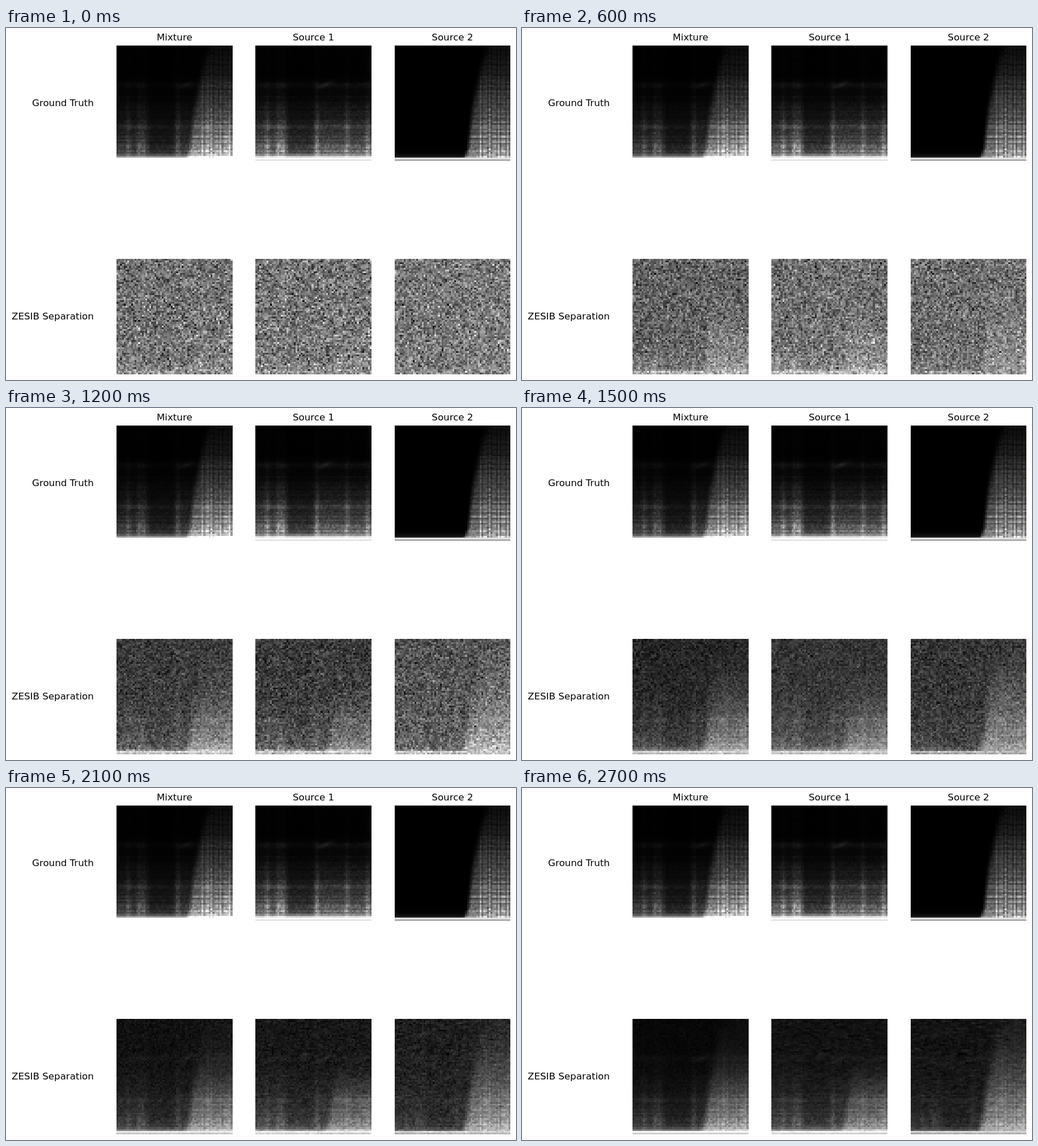
An HTML page with a canvas that plays this animation: 900x622 px, repeating every 3600 ms.

```html
<!DOCTYPE html>
<html lang="en">
<head>
<meta charset="utf-8">
<title>Spectrogram separation</title>
<style>
  html, body { margin: 0; width: 100%; height: 100%; overflow: hidden; background: #fff; }
  svg, canvas { position: absolute; left: 0; top: 0; }
  text { font: 16.67px "DejaVu Sans", sans-serif; fill: #000; }
</style>
</head>
<body>
<canvas id="stage" width="900" height="622"></canvas>
<svg width="900" height="622">
  <g text-anchor="middle">
    <text x="297.3" y="22.3">Mixture</text>
    <text x="542.6" y="22.3">Source 1</text>
    <text x="787.9" y="22.3">Source 2</text>
  </g>
  <g text-anchor="end">
    <text x="154.8" y="138">Ground Truth</text>
    <text x="154.8" y="515">ZESIB Separation</text>
  </g>
</svg>
<script>
const N = 64, STEP = 300, LOOP = 3600, LAST = 9;
const SIZE = 204.5, LEFT = 195, TOP = 30.6, GAP_X = 245.4, GAP_Y = 377;

const ctx = document.getElementById("stage").getContext("2d");
ctx.imageSmoothingEnabled = false;
const tile = document.createElement("canvas");
tile.width = tile.height = N;
const tileCtx = tile.getContext("2d");

function random(seed) {
  return () => {
    seed = seed + 0x6D2B79F5 | 0;
    let t = Math.imul(seed ^ seed >>> 15, 1 | seed);
    t = t + Math.imul(t ^ t >>> 7, 61 | t) ^ t;
    return ((t ^ t >>> 14) >>> 0) / 4294967296;
  };
}

function gaussian(rnd) {
  return Math.sqrt(-2 * Math.log(1 - rnd())) * Math.cos(2 * Math.PI * rnd());
}

const fill = (n, make) => Array.from({ length: n }, (_, i) => make(i));
const grid = f => fill(N * N, i => f(i / N | 0, i % N, i));
const clamp = v => Math.min(1, Math.max(0, v));
const bump = (x, mid, width) => Math.exp(-(((x - mid) / width) ** 2));
const smooth = (a, b, x) => {
  const k = clamp((x - a) / (b - a));
  return k * k * (3 - 2 * k);
};

const rnd = random(41);
const rowNoise = fill(N, () => rnd() - .5);
const grain = grid(() => rnd() - .5);
const streak = [];
for (let i = 0; i < N * N; i++) {
  const n = gaussian(rnd);
  streak.push(i % 3 ? .75 * streak[i - 1] + .4 * n : n);
}

// Steady tone: bright notes in a few columns, a quiet gap between them.
const NOTES = [6, 12, 14.5, 33.5, 50, 61.5];

function source1(r, c, detail) {
  const low = clamp((62 - r) / 3);
  const level = .01 + .36 * clamp((r - 18) / 42) ** 1.6 + .045 * smooth(41, 45, r)
    + .05 * bump(r, 21.5, 2);
  const quiet = smooth(16, 19, c) - smooth(30, 33, c);
  const notes = NOTES.reduce((sum, n) => sum + .55 * bump(c, n, 1.2), 0);
  const gain = 1 + (notes - .1 - .35 * quiet) * low * detail;
  const line = 1 + rowNoise[r] * .45 * low * detail;
  const dust = 1 + grain[r * N + c] * .45 * low;
  const wisp = .08 * bump(c, 37 + (22 - r) * 1.5, 2.5) * bump(r, 21.5, 2);
  const glow = Math.exp(Math.min(0, r - 62) / 1.2);
  return clamp(level * gain * line * dust + wisp + glow) * (r > 62 ? .9 : 1);
}

// Sound that sets in late: silent left of a curved edge, striped right of it.
function source2(r, c, detail, soft = 0) {
  if (r > 61) return r > 62 ? .74 : .97;
  const u = 1 - r / 62;
  const edge = 39 + 9 * u * u - 3 * Math.exp((r - 62) / 3) - soft;
  const mask = smooth(edge, edge + 3 + soft + 3 * u, c);
  const level = .05 + .58 * (r / 61) ** 1.5 + .25 * Math.exp(r - 62);
  const stripes = c < 47 ? -.2 : .25 * Math.cos((c - 49.5) * 2 * Math.PI / 2.5);
  const wave = .2 * Math.sin(r * 2.3 + 2 * bump(c, 52, 1.5)) + .3 * rowNoise[N - 1 - r];
  const dust = 1 + grain[r * N + c] * .35;
  return Math.max(.35 * Math.exp(r - 62), level * mask * (1 + stripes * detail) * (1 + wave * detail) * dust);
}

const mix = (a, b, ka, kb) => a.map((v, i) => clamp(ka * v + kb * b[i]));
const average = (a, b) => a.map((v, i) => (v + b[i]) / 2);

const truth1 = grid((r, c) => source1(r, c, 1));
const truth2 = grid((r, c) => source2(r, c, 1));
// The residual has opposite signs in the two estimates, so their mean stays clean.
const goal1 = grid((r, c, i) =>
  .72 * source1(r, c, .75) + .5 * source2(r, c, .4) * clamp((r - 20) / 24) + .026 * streak[i]);
const goal2 = grid((r, c, i) =>
  (.3 * source1(r, c, .8) + .75 * source2(r, c, .45, 2)) * (r > 60 ? .8 : 1) - .026 * streak[i]);

// Stretches the values so that the lowest is black and the highest white.
function paint(values, col, row) {
  const lo = Math.min(...values), hi = Math.max(1, ...values);
  const image = tileCtx.createImageData(N, N);
  values.forEach((v, i) => {
    const g = Math.round(255 * (v - lo) / (hi - lo));
    image.data.set([g, g, g, 255], i * 4);
  });
  tileCtx.putImageData(image, 0, 0);
  const x = LEFT + col * GAP_X, y = TOP + row * GAP_Y;
  ctx.clearRect(x - 2, y - 2, SIZE + 4, SIZE + 4);
  ctx.drawImage(tile, x, y, SIZE, SIZE);
}

const paintRow = (row, ...panels) => panels.forEach((values, col) => paint(values, col, row));

const sigma = step => 1.3 * .6 ** step;

function estimate(goal, step, seed) {
  const noise = random(seed + step * 97);
  return goal.map(v => v + sigma(step) * gaussian(noise));
}

const steps = fill(LAST + 1, k => {
  const a = estimate(goal1, k, 1009), b = estimate(goal2, k, 5003);
  return [average(a, b), a, b];
});
const start = performance.now();
let shown = -1;

function draw(now) {
  const time = Math.max(0, now - start) % LOOP;
  const step = Math.min(LAST, Math.floor(time / STEP));
  if (step !== shown) {
    shown = step;
    paintRow(1, ...steps[step]);
  }
  requestAnimationFrame(draw);
}

paintRow(0, mix(truth1, truth2, .6, .68), truth1, truth2);
draw(start);
</script>
</body>
</html>
```
